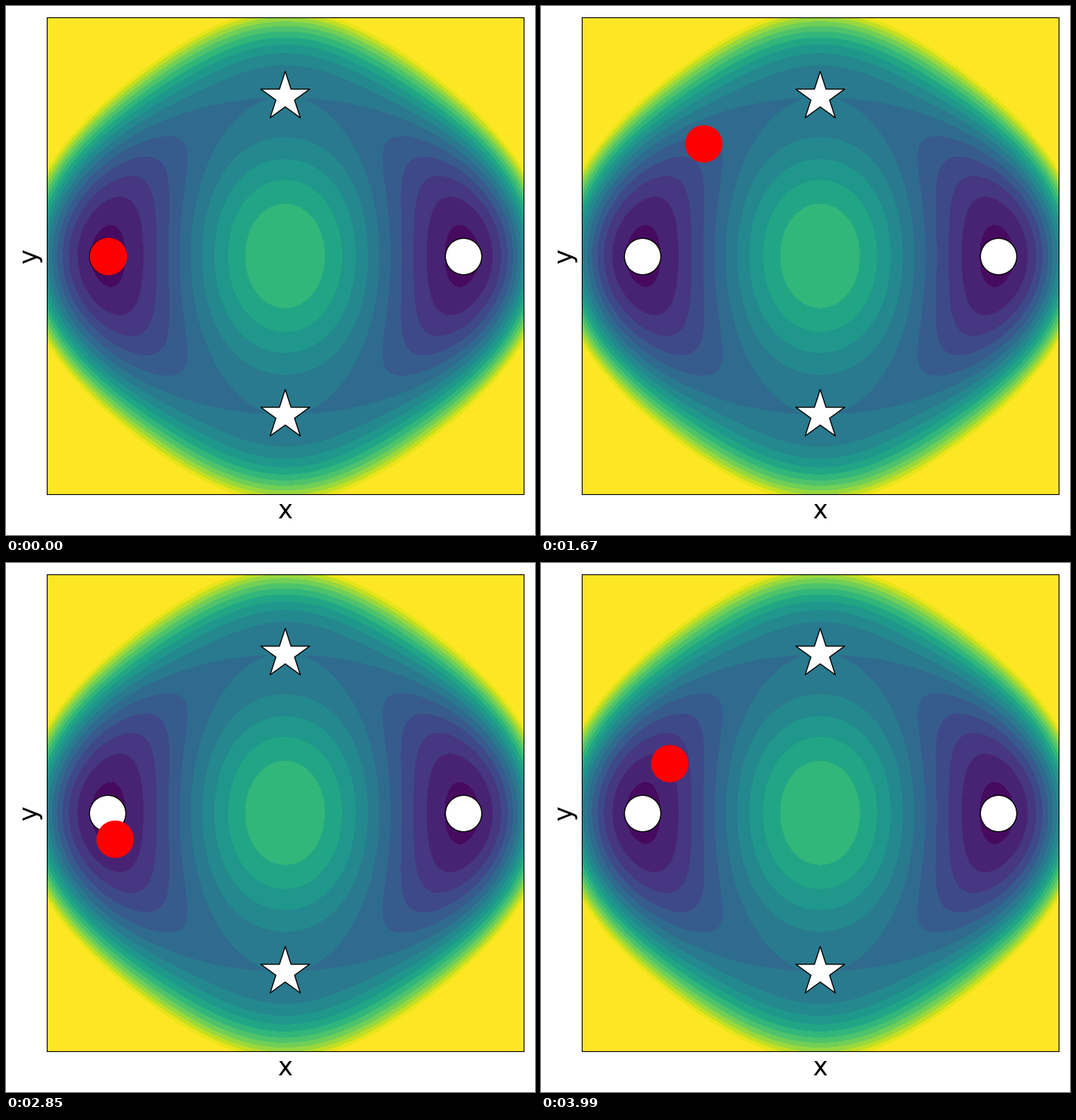
Write a matplotlib script that moves like this. It is 700 by 700 pixels and loops after 4.01 s.

```python
import numpy as np
import matplotlib.pyplot as plt
from matplotlib.animation import FuncAnimation

SIZE, DPI = 700, 100
LOOP, TICK = 4010, 10
JITTER = 4.5  # pixels per step

# A few points the walker passes: time in ms, pixels from the top left
KEYS = [(0, 135, 331), (300, 100, 330), (680, 136, 366), (1030, 152, 263),
        (1400, 215, 157), (1670, 215, 182), (2390, 162, 354),
        (2850, 144, 365), (3120, 162, 406), (3530, 125, 328),
        (3990, 170, 265)]

# The walker moves every 20 ms, with one longer rest
STEPS = np.r_[0:801:20, 850:3991:20]


def potential(x, y):
    """Double well with two transition channels, zero at the saddles."""
    v = (4 * (1 - x**2 - y**2)**2 + 2 * (x**2 - 2)**2
         + ((x + y)**2 - 1)**2 + ((x - y)**2 - 1)**2) / 6
    return v - 4 / 3


def bridge(t, p, rng):
    """Random walk over STEPS that is pinned to p at the times t."""
    walk = np.cumsum(rng.normal(0, JITTER, len(STEPS)))
    drift = p - np.interp(t, STEPS, walk)
    return walk + np.interp(STEPS, t, drift)


fig, ax = plt.subplots(figsize=(SIZE / DPI, SIZE / DPI), dpi=DPI)
axis = np.linspace(-1.5, 1.5, 201)
X, Y = np.meshgrid(axis, axis)
ax.contourf(X, Y, potential(X, Y), levels=np.linspace(-1.2, 2, 17),
            cmap="viridis", extend="max")
ax.set(xlim=(-1.5, 1.5), ylim=(-1.5, 1.5), xticks=[], yticks=[])
ax.set_xlabel("x", fontsize=24)
ax.set_ylabel("y", fontsize=24)

well = np.sqrt(1.25)
white = dict(color="white", edgecolor="black", linewidth=1, zorder=3)
ax.scatter([-well, well], [0, 0], s=1200, marker="o", **white)
ax.scatter([0, 0], [-1, 1], s=2400, marker="*", **white)
dot = ax.scatter([-well], [0], s=1200, color="red", zorder=5)
fig.tight_layout()

rng = np.random.default_rng(7)
t, kx, ky = np.array(KEYS, float).T
px, py = bridge(t, kx, rng), bridge(t, ky, rng)
path = ax.transData.inverted().transform(np.column_stack([px, SIZE - py]))


def update(i):
    k = np.searchsorted(STEPS, i * TICK, side="right") - 1
    dot.set_offsets(path[k])
    return dot,


anim = FuncAnimation(fig, update, frames=LOOP // TICK, interval=TICK,
                     repeat=True, repeat_delay=0, blit=False)
plt.show()
```
